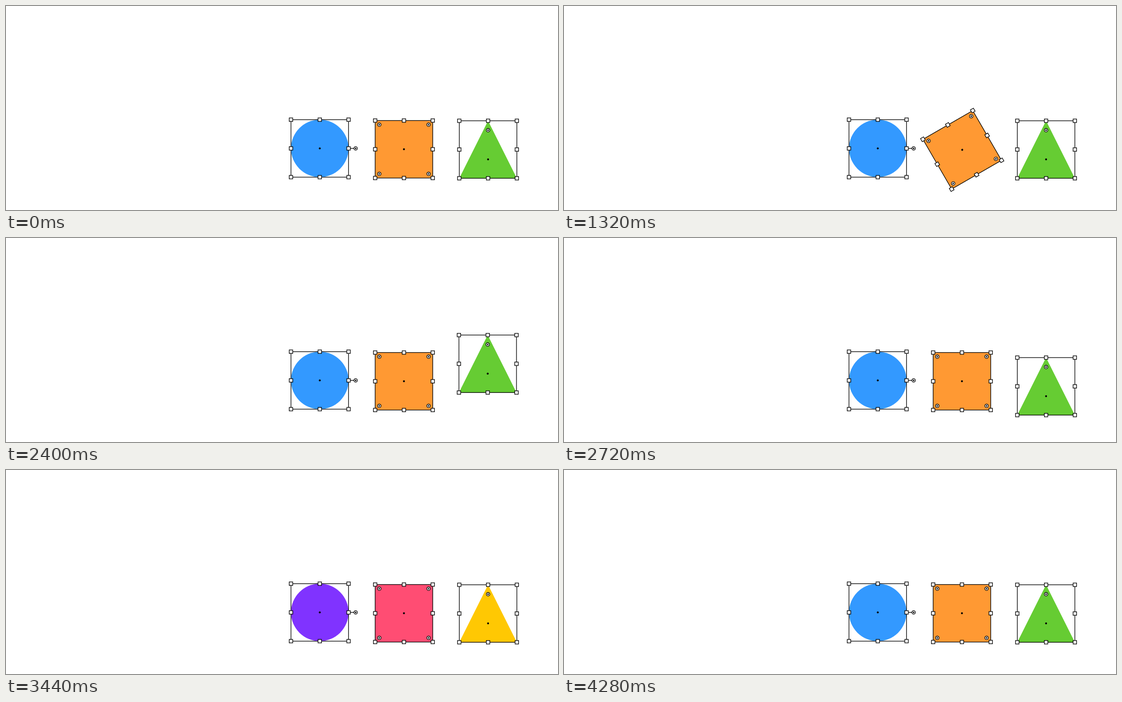
Write an HTML page with a canvas that moves like this. It is 1143 by 423 pixels and loops after 6000 ms.

```html
<!DOCTYPE html>
<html>
<head>
<meta charset="utf-8">
<style>
  html, body { margin: 0; height: 100%; overflow: hidden; background: #fff; }
  canvas { display: block; }
</style>
</head>
<body>
<canvas id="stage" width="1143" height="423"></canvas>
<script>
const ctx = document.getElementById('stage').getContext('2d');
const LOOP = 6000, STEP = 40, HALF = 59.6;

const clamp = v => Math.max(0, Math.min(1, v));
const progress = (t, from, to) => clamp((t - from) / (to - from));
// Rises linearly to 1 at mid, then falls back to 0.
const bump = (t, from, mid, to) => progress(t, from, mid) - progress(t, mid, to);

function mix(a, b, k) {
  return `rgb(${a.map((v, i) => Math.round(v + (b[i] - v) * k))})`;
}

function dot(x, y, r) {
  ctx.beginPath();
  ctx.arc(x, y, r, 0, 2 * Math.PI);
}

function knob(x, y) {
  dot(x, y, 3.6);
  ctx.fillStyle = '#fff';
  ctx.fill();
  ctx.stroke();
  dot(x, y, 1.6);
  ctx.fillStyle = '#000';
  ctx.fill();
}

function drawFrame(knobs, pivotY) {
  ctx.strokeStyle = '#000';
  ctx.lineWidth = 1.3;
  ctx.strokeRect(-HALF, -HALF, 2 * HALF, 2 * HALF);
  for (const i of [-1, 0, 1]) for (const j of [-1, 0, 1]) {
    if (!i && !j) continue;
    const box = [i * HALF - 3.6, j * HALF - 3.6, 7.2, 7.2];
    ctx.fillStyle = '#fff';
    ctx.fillRect(...box);
    ctx.strokeRect(...box);
  }
  knobs.forEach(([x, y]) => knob(x, y));
  dot(0, pivotY, 2);
  ctx.fillStyle = '#000';
  ctx.fill();
}

const shapes = [
  {
    x: 649.7, y: 295.3, pivotY: 0,
    knobs: [[74.3, 0]],
    colors: [[51, 153, 255], [128, 51, 255]],
    on: [3000, 3120], off: [3720, 3840],
    move(t) {
      const shrink = 0.6 * bump(t, 0, 480, 1000);
      ctx.translate(-1.7 * shrink, 0);
      ctx.scale(1 - shrink, 1 - shrink);
    },
    path() {
      dot(0, 0, HALF);
      ctx.fill();
      ctx.beginPath();
      ctx.moveTo(HALF, 0);
      ctx.lineTo(71, 0);
      ctx.lineWidth = 1.3;
      ctx.stroke();
    }
  },
  {
    x: 824, y: 297.1, pivotY: 0,
    knobs: [[-51, -51], [51, -51], [51, 51], [-51, 51]],
    colors: [[255, 153, 51], [255, 77, 115]],
    on: [3200, 3320], off: [4000, 4120],
    move(t) {
      // The pivot lies slightly off the centre.
      ctx.translate(0.6, 0.4);
      ctx.rotate(-2 * Math.PI * progress(t, 1000, 1960));
      ctx.translate(-0.6, -0.4);
    },
    path() {
      ctx.fillRect(-HALF, -HALF, 2 * HALF, 2 * HALF);
    }
  },
  {
    x: 998.2, y: 297.6, pivotY: 20.5,
    knobs: [[0, -40]],
    colors: [[102, 204, 51], [255, 200, 3]],
    on: [3320, 3440], off: [4200, 4280],
    move(t) {
      const left = bump(t, 1960, 2080, 2200), up = bump(t, 2200, 2360, 2520);
      const down = bump(t, 2520, 2640, 2760), right = bump(t, 2760, 2880, 3000);
      ctx.translate(30 * (right - left) - up, 30 * down - 49 * up);
    },
    path() {
      ctx.beginPath();
      ctx.moveTo(0, -HALF);
      ctx.lineTo(HALF, HALF);
      ctx.lineTo(-HALF, HALF);
      ctx.fill();
    }
  }
];

function draw(now) {
  const t = Math.floor((now % LOOP) / STEP) * STEP;
  ctx.fillStyle = '#fff';
  ctx.fillRect(0, 0, 1143, 423);
  for (const s of shapes) {
    ctx.save();
    ctx.translate(s.x, s.y);
    s.move(t);
    ctx.fillStyle = mix(...s.colors, progress(t, ...s.on) - progress(t, ...s.off));
    s.path();
    drawFrame(s.knobs, s.pivotY);
    ctx.restore();
  }
}

const start = performance.now();
function tick() {
  draw(performance.now() - start);
  requestAnimationFrame(tick);
}
tick();
</script>
</body>
</html>
```
